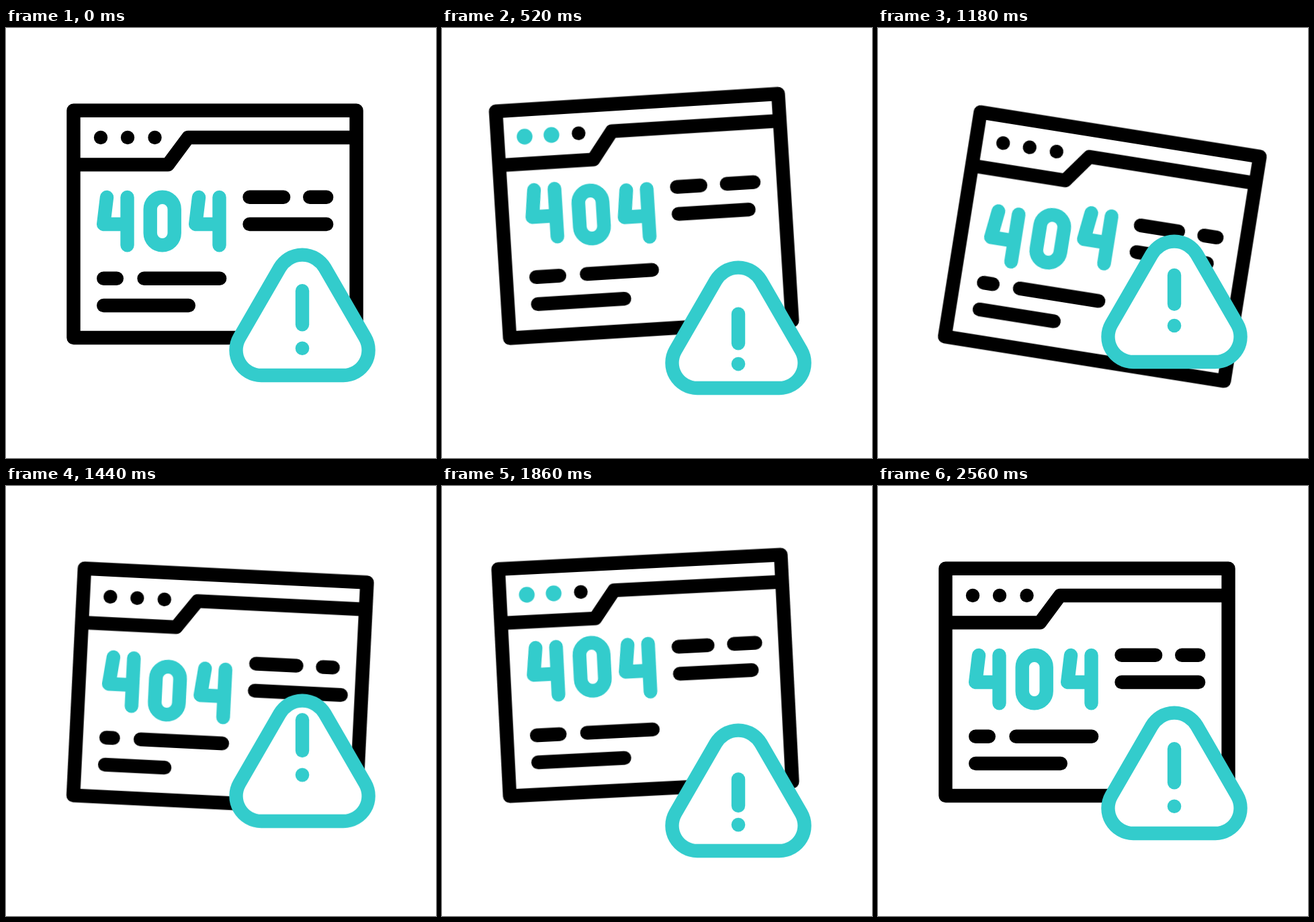
These frames come from a looping animation (640 px wide and 640 px high, 3000 ms). An HTML page:

```html
<!DOCTYPE html>
<html lang="en">
<head>
<meta charset="utf-8">
<title>404 warning</title>
<style>
  html, body { margin: 0; width: 100%; height: 100%; overflow: hidden; background: #fff; }
  svg { display: block; width: 100vw; height: 100vh; }

  svg * {
    animation-duration: 3s;
    animation-iteration-count: infinite;
    animation-timing-function: cubic-bezier(.37, 0, .63, 1);
  }
  .line { fill: none; stroke-width: 20.4; stroke-linecap: round; stroke-linejoin: round; }
  .black { stroke: #000; }
  .cyan { stroke: #3cc; }
  .mark { fill: #3cc; }
  .bars rect { height: 20.4px; rx: 10.2px; }

  #window { transform-origin: 111px 453px; animation-name: tilt; }
  #sign { animation-name: bob; }
  .digit { animation-name: hop; }
  .dot { r: 10.2px; animation-name: pulse; }
  .second { animation-delay: .16s; }
  .third { animation-delay: .32s; }

  #a1 { animation-name: a1; }
  #a2 { animation-name: a2; }
  #b { animation-name: b; }
  #c1 { animation-name: c1; }
  #c2 { animation-name: c2; }
  #d { animation-name: d; }
  #stem { animation-name: stem; }
  #point { animation-name: point; }

  @keyframes tilt {
    0%, 7.17%, 71.5%, 100% { transform: rotate(0deg); }
    23.17% { transform: rotate(-5deg); }
    39.5% { transform: rotate(9.05deg); }
    57.07% { transform: rotate(-3.95deg); }
  }
  @keyframes bob {
    0%, 8.33%, 85%, 100% { transform: translateY(0); }
    22.67%, 63.83% { transform: translateY(27px); }
    43.33% { transform: translateY(-24.5px); }
  }
  @keyframes hop {
    0%, 7%, 73%, 100% { transform: translateY(0); }
    23.33%, 56.5% { transform: translateY(-12.5px); }
    40.17% { transform: translateY(12.3px); }
  }
  @keyframes pulse {
    0%, 10%, 27.2%, 54.67%, 74.33%, 100% { fill: #000; r: 10.2px; }
    11.5%, 25.7%, 56.17%, 72.5% { fill: #3cc; r: 11.7px; }
  }

  /* text bars: neighbours trade length, single bars grow and shrink */
  @keyframes a1 {
    0%, 6.33%, 84%, 100% { width: 71px; }
    25.33% { width: 46.5px; }
    44% { width: 82px; }
    70% { width: 59px; }
  }
  @keyframes a2 {
    0%, 6.33%, 84%, 100% { x: 442px; width: 45.3px; }
    25.33% { x: 417.5px; width: 69.8px; }
    44% { x: 453px; width: 34.3px; }
    70% { x: 430px; width: 57.3px; }
  }
  @keyframes b {
    0%, 11.5%, 84%, 100% { width: 135px; }
    28.67% { width: 97px; }
    48.33% { width: 149px; }
    69.33% { width: 120px; }
  }
  @keyframes c1 {
    0%, 6.33%, 84%, 100% { width: 40px; }
    25.33%, 71.67% { width: 64px; }
    44% { width: 29px; }
  }
  @keyframes c2 {
    0%, 6.33%, 84%, 100% { x: 195.3px; width: 133px; }
    25.33%, 71.67% { x: 219.3px; width: 109px; }
    44% { x: 184.3px; width: 144px; }
  }
  @keyframes d {
    0%, 12.67%, 83.33%, 100% { width: 147px; }
    28.67%, 67.67% { width: 159.5px; }
    49.17% { width: 109px; }
  }

  @keyframes stem {
    0%, 7%, 84.67%, 100% { y: 381px; height: 70.4px; }
    26.83%, 67% { y: 410px; height: 58.4px; }
    49.33% { y: 355.5px; height: 66.4px; }
  }
  @keyframes point {
    0%, 7%, 84.67%, 100% { cy: 476.8px; }
    26.83%, 67% { cy: 484.8px; }
    49.33% { cy: 447.8px; }
  }
</style>
</head>
<body>
<svg viewBox="0 0 640 640">
  <defs>
    <path id="four" d="M150 252 L145.2 292 H180.5 M180.5 252 V323.2"/>
  </defs>

  <g id="window">
    <path class="line black" d="M100.5 122.7 H521.5 V461 H100.5 Z M100.5 203.4 H241 L271 163 H521.5"/>

    <circle class="dot" cx="141" cy="163"/>
    <circle class="dot second" cx="181" cy="163"/>
    <circle class="dot third" cx="221.5" cy="163"/>

    <g class="line cyan">
      <g class="digit"><use href="#four"/></g>
      <rect class="digit second" x="214.7" y="251.7" width="36" height="71.6" rx="18"/>
      <g class="digit third"><use href="#four" x="137"/></g>
    </g>

    <g class="bars">
      <rect id="a1" x="352.3" y="241.5" width="71"/>
      <rect id="a2" x="442" y="241.5" width="45.3"/>
      <rect id="b" x="352.3" y="281.8" width="135"/>
      <rect id="c1" x="135" y="362.6" width="40"/>
      <rect id="c2" x="195.3" y="362.6" width="133"/>
      <rect id="d" x="135" y="402.8" width="147"/>
    </g>
  </g>

  <g id="sign">
    <path class="line cyan" style="fill:#fff" d="M407.5 356.9 A38.7 38.7 0 0 1 474.5 356.9
      L534.5 460.7 A37.5 37.5 0 0 1 502 517 H380 A37.5 37.5 0 0 1 347.5 460.7 Z"/>
    <rect id="stem" class="mark" x="430.8" y="381" width="20.4" height="70.4" rx="10.2"/>
    <circle id="point" class="mark" cx="441" cy="476.8" r="10.3"/>
  </g>
</svg>
</body>
</html>
```
